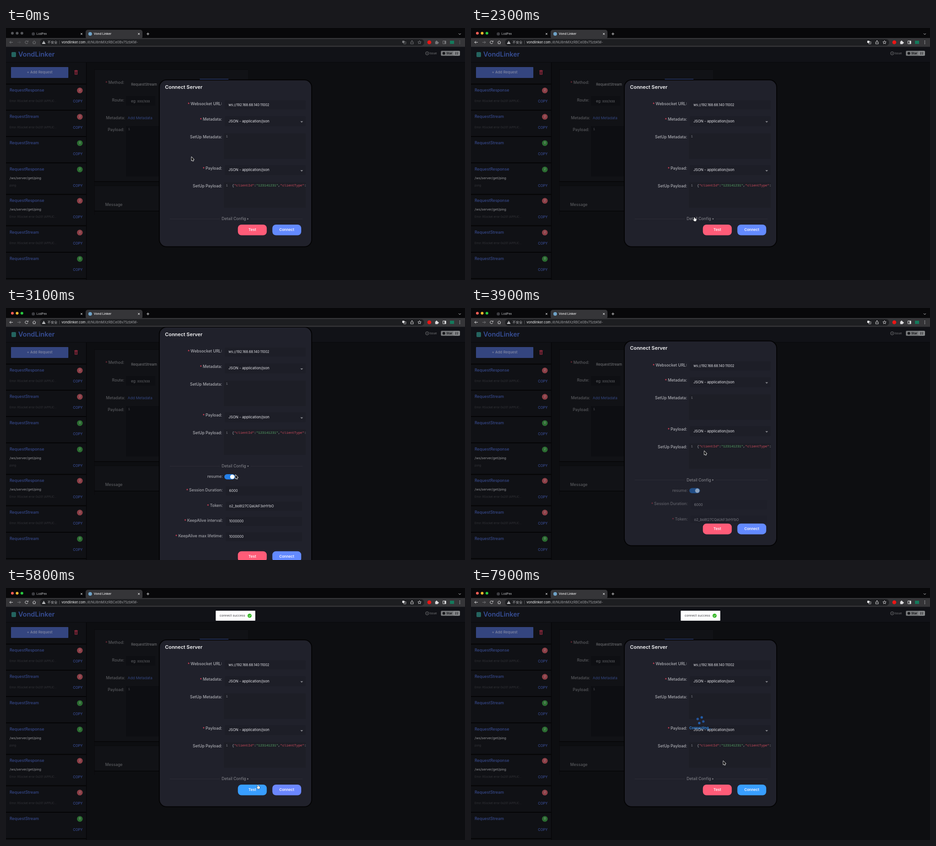
An HTML page with a canvas for the animation above (8000 ms loop, 1009 px wide and 555 px high).

```html
<!DOCTYPE html>
<html lang="en">
<head>
<meta charset="utf-8">
<title>Connect Server</title>
<style>
html, body { margin: 0; width: 100%; height: 100%; overflow: hidden; background: #0d0e11; }
canvas { display: block; width: 1009px; height: 555px; }
</style>
</head>
<body>
<canvas id="stage"></canvas>
<script>
const W = 1009, H = 555, LOOP = 8000;
const canvas = document.getElementById('stage');
const ctx = canvas.getContext('2d');
const dpr = window.devicePixelRatio || 1;
canvas.width = W * dpr;
canvas.height = H * dpr;

const SANS = 'Inter, "Noto Sans CJK SC", "Noto Sans", sans-serif';
const MONO = '"Liberation Mono", "DejaVu Sans Mono", monospace';
const PINK = '#ff5c78', BLUE = '#389eff', INDIGO = '#638aff';
const FIELD = '#1d1e27', EDITOR = '#1d1e26';
const DETAIL_HEIGHT = 175;

const clamp = v => Math.max(0, Math.min(1, v));
const smooth = v => v * v * (3 - 2 * v);
const ramp = (t, from, to) => smooth(clamp((t - from) / (to - from)));

function rect(x, y, w, h, fill, r = 0) {
  ctx.fillStyle = fill;
  ctx.beginPath();
  ctx.roundRect(x, y, w, h, r);
  ctx.fill();
}

function disc(x, y, r, fill) {
  ctx.fillStyle = fill;
  ctx.beginPath();
  ctx.arc(x, y, r, 0, Math.PI * 2);
  ctx.fill();
}

function ring(x, y, r, color, from = 0, to = Math.PI * 2) {
  ctx.strokeStyle = color;
  ctx.lineWidth = 1;
  ctx.beginPath();
  ctx.arc(x, y, r, from, to);
  ctx.stroke();
}

function line(points, color, width = 1) {
  ctx.strokeStyle = color;
  ctx.lineWidth = width;
  ctx.beginPath();
  points.forEach(([x, y], i) => i ? ctx.lineTo(x, y) : ctx.moveTo(x, y));
  ctx.stroke();
}

function poly(points, fill) {
  ctx.fillStyle = fill;
  ctx.beginPath();
  points.forEach(([x, y]) => ctx.lineTo(x, y));
  ctx.closePath();
  ctx.fill();
}

function text(str, x, y, size, color, weight = 400, align = 'left', family = SANS) {
  ctx.font = `${weight} ${size}px ${family}`;
  ctx.textAlign = align;
  ctx.textBaseline = 'middle';
  ctx.fillStyle = color;
  ctx.fillText(str, x, y);
}

function label(str, right, y, color, required, star = '#e0455c') {
  text(str, right, y, 8.8, color, 500, 'right');
  if (required) text('*', right - ctx.measureText(str).width - 2, y + 1, 8.8, star, 500, 'right');
}

function cross(x, y, r, color) {
  line([[x - r, y - r], [x + r, y + r]], color);
  line([[x + r, y - r], [x - r, y + r]], color);
}

function drawBrowser(focused) {
  const icon = focused ? '#dcdcde' : '#77787b';
  const dim = focused ? '#77787b' : '#4b4c50';
  rect(0, 0, W, 22, '#08080a');
  rect(175, 4, 125, 20, '#353538', 5);
  rect(0, 22, W, 19.5, '#353538');
  const lights = focused ? ['#ff5f57', '#febc2e', '#28c840'] : Array(3).fill('#55565a');
  lights.forEach((c, i) => disc(14 + i * 10.5, 11.5, 3, c));

  disc(60, 13, 3.5, '#3c3d42');
  text('LodPex', 67, 13, 6.5, '#c6c7ca');
  cross(166, 13, 2, '#d5d6d8');
  disc(185, 13, 4, '#6fa3c8');
  text('Vond Linker', 193, 13, 6.8, '#eeeeef', 500);
  cross(292, 13, 2, '#e8e8e9');
  line([[309, 13], [315, 13]], '#e0e0e2');
  line([[312, 10], [312, 16]], '#e0e0e2');
  line([[995, 12], [997.5, 14.5], [1000, 12]], '#d0d0d2');

  line([[15, 31.5], [8, 31.5]], icon);
  line([[11, 28.5], [8, 31.5], [11, 34.5]], icon);
  line([[25, 31.5], [32, 31.5]], dim);
  line([[29, 28.5], [32, 31.5], [29, 34.5]], dim);
  ring(45, 31.5, 3, icon, 0.3, 5.4);
  poly([[46, 30.5], [49, 30.5], [49, 27.5]], icon);
  line([[58.5, 31.5], [62, 28.3], [65.5, 31.5]], icon);
  line([[59.7, 31], [59.7, 34.7], [64.3, 34.7], [64.3, 31]], icon);

  rect(75, 24.5, 844, 14.5, '#1d1e21', 7);
  poly([[83, 28], [87, 35], [79, 35]], '#c4c5c8');
  rect(82.6, 30.2, 0.8, 2.4, '#1d1e21');
  text('不安全', 91, 31.5, 7.4, '#b0b1b4');
  rect(117, 27.5, 0.7, 8, '#5c5d61');
  text('vondlinker.com', 122, 31.5, 7.4, '#f0f0f1');
  text('/#/NU8mMXzRBCe0Bv75zbKM-', 177, 31.5, 7.4, '#9b9ca0');

  rect(871, 28, 5, 5, icon, 1);
  ctx.strokeStyle = icon;
  ctx.lineWidth = 0.8;
  ctx.strokeRect(874.5, 30.5, 4.5, 4.5);
  line([[890.5, 30.5], [889.5, 30.5], [889.5, 35], [895.5, 35], [895.5, 30.5], [894.5, 30.5]], icon, 0.9);
  line([[892.5, 33], [892.5, 27.5]], icon, 0.9);
  line([[890.8, 29.2], [892.5, 27.5], [894.2, 29.2]], icon, 0.9);
  const star = Array.from({ length: 11 }, (_, i) => {
    const a = -Math.PI / 2 + i * Math.PI / 5, r = i % 2 ? 1.8 : 3.9;
    return [909 + Math.cos(a) * r, 31.7 + Math.sin(a) * r];
  });
  line(star, icon, 0.9);
  disc(930.5, 31.5, 4.3, '#ec1515');
  rect(943.5, 29.5, 6, 6, icon, 1);
  disc(946.5, 29.2, 1.4, icon);
  disc(950, 32.5, 1.4, icon);
  line([[960.5, 28.5], [967, 28.5], [967, 34.8], [960.5, 34.8], [960.5, 28]], icon);
  rect(964, 28.5, 3, 6.3, icon);
  rect(976, 28, 9, 7, '#147a5c');
  for (let i = 0; i < 3; i++) disc(997.5, 28.5 + i * 3, 0.8, icon);
}

const requests = [
  { y: 137, kind: 'RequestResponse', n: 2, note: 'error' },
  { y: 195, kind: 'RequestStream', n: 2, note: 'error' },
  { y: 253, kind: 'RequestStream', n: 0 },
  { y: 311, kind: 'RequestResponse', n: 2, ok: true, path: true, note: 'pong' },
  { y: 380, kind: 'RequestResponse', n: 2, path: true, note: 'error' },
  { y: 450, kind: 'RequestStream', n: 2, note: 'error' },
  { y: 508, kind: 'RequestStream', n: 0 }
];

function drawSidebar() {
  rect(0, 76, 176, 479, '#101115');
  rect(176, 76, 1.5, 479, '#060608');
  rect(11, 86, 126, 24, '#34457f', 1);
  text('+ Add Request', 74, 98, 8, '#8389a3', 500, 'center');
  ctx.strokeStyle = '#a52c43';
  ctx.lineWidth = 1.2;
  ctx.strokeRect(151.6, 95.5, 4.8, 6.5);
  line([[150, 94], [158, 94]], '#a52c43', 1.2);
  line([[152.5, 93.2], [155.5, 93.2]], '#a52c43');
  cross(154, 98.7, 1.1, '#a52c43');

  rect(0, 122.5, 176, 2, '#040405');
  for (const { y, kind, n, ok, path, note } of requests) {
    const bottom = y + (path ? 36 : 24.5);
    text(kind, 8, y + 0.5, 8.8, '#36498b', 500);
    disc(162.3, y + 0.5, 6.3, ok || !n ? '#2b6d31' : '#8d3f47');
    text(String(n), 162.3, y + 0.7, 6, '#a3a0a1', 400, 'center');
    if (path) text('/ws/server/get/ping', 8, y + 19.5, 7.3, '#85868a', 500);
    if (note) text(note === 'pong' ? 'pong' : 'Error: RSocket error 0x201 (APPLIC...', 8, bottom, 5.9, '#34353a');
    text('COPY', 168.5, bottom + 0.5, 7.5, '#384d96', 500, 'right');
    rect(0, bottom + 18.5, 176, 2, '#040405');
  }
}

function drawPage() {
  rect(0, 41, W, 514, '#0d0e11');
  rect(0, 41.5, W, 34, '#111217');
  rect(0, 75, W, 1, '#08090b');
  rect(12, 53, 10, 11, '#24645f', 2);
  text('VondLinker', 27, 58.5, 14.6, '#364d94', 600);
  ring(925.8, 55.8, 3.5, '#77787b');
  disc(925.8, 55.8, 0.9, '#77787b');
  text('Issue', 931, 55.8, 6.4, '#77787b');
  rect(956, 50.3, 42, 11, '#77797b', 2);
  rect(983.5, 50.8, 14, 10, '#888a8c', 1);
  disc(962.5, 55.8, 3, '#151619');
  text('Star', 968, 55.9, 6.5, '#101114', 700);
  text('22', 990.5, 55.9, 6.5, '#101114', 600, 'center');
  drawSidebar();

  rect(194, 91, 338, 247, '#111216');
  rect(194, 347, 338, 56, '#111216');
  rect(194, 91, 1, 321, '#0a0a0c');
  rect(194, 91, 338, 1, '#090a0c');
  rect(194, 337.5, 338, 1.5, '#050506');
  rect(194, 347, 338, 1, '#090a0c');
  rect(194, 402.5, 338, 1.5, '#050506');
  rect(426, 112, 63, 2, '#30447f');
  rect(264, 150, 64, 21, '#0e0f13');
  rect(264, 216, 80, 111, '#0d0e12');

  const grey = '#58595d';
  label('Method:', 260, 120.5, grey, true, '#7c2c3a');
  label('Route:', 260, 159.5, grey);
  label('Metadata:', 262, 198, grey);
  label('Payload:', 260, 224.5, grey);
  text('RequestStream', 275, 124.8, 7.9, '#78797c');
  text('eg: xxx/xxx', 275, 161.3, 7.7, '#68696d');
  text('Add Metadata', 267.5, 198.5, 8.2, '#33467f');
  text('1', 268.5, 223.5, 7, '#55565a', 400, 'left', MONO);
  text('Message', 218, 389, 8.8, grey, 500);
}

function drawButton(str, x, y, fill) {
  rect(x, y - 11.8, 63.5, 23.6, fill, 8);
  text(str, x + 31.7, y + 0.2, 8, '#f8f6fb', 600, 'center');
}

function drawCode(y) {
  const parts = [['{', '#b9bac0'], ['"clientId"', '#d54c5e'], [':', '#b9bac0'],
    ['"123141231"', '#58a968'], [',', '#b9bac0'], ['"clientType"', '#d54c5e'], [':', '#b9bac0']];
  let x = 497;
  for (const [str, color] of parts) {
    text(str, x, y, 7.35, color, 400, 'left', MONO);
    x += ctx.measureText(str).width;
  }
}

function drawSelect(top, y) {
  rect(481, top + y - 11, 178, 22, FIELD, 2);
  text('JSON - application/json', 489, top + y, 8, '#e8e8ed');
  const cy = top + y + 1;
  poly([[647, cy - 1], [653, cy - 1], [650, cy + 2.3]], '#85868c');
}

const details = [
  ['Session Duration:', '6000', 359.3],
  ['Token:', 'o2_bo8t27CQaUkF3xHYbO', 393],
  ['KeepAlive interval:', '1000000', 426.5],
  ['KeepAlive max lifetime:', '1000000', 460.2]
];

function drawDetails(top, extra, alpha) {
  ctx.save();
  ctx.beginPath();
  ctx.rect(337, top + 317, 335, extra + 1);
  ctx.clip();
  ctx.globalAlpha = alpha;
  label('resume:', 476.5, top + 329.5, '#a2a3a9', true && false);
  rect(480, top + 324, 23.5, 11.5, '#2580e8', 6);
  disc(497.5, top + 329.8, 4.8, '#ffffff');
  for (const [name, value, y] of details) {
    label(name, 476.5, top + y, '#a2a3a9', true);
    rect(483, top + y - 8.5, 168, 20, FIELD, 2);
    text(value, 490.5, top + y + 1.7, 7.6, '#e2e2e7');
  }
  ctx.restore();
}

function drawModal(top, extra, alpha, open, testFill, connectFill) {
  const height = 367.5 + extra;
  rect(336, top - 1, 337, height + 2, '#030304', 17);
  rect(338, top + 1, 333, height - 2, '#20212b', 15);
  text('Connect Server', 349.5, top + 16.7, 10.9, '#f4f4f6', 600);

  const grey = '#acadb3';
  label('Websocket URL:', 475, top + 53.5, grey, true);
  rect(481, top + 45, 178, 20, FIELD, 2);
  text('ws://192.168.68.140:11002', 489, top + 55.2, 7.4, '#e8e8ed');
  label('Metadata:', 475, top + 87.3, grey, true);
  drawSelect(top, 91);
  label('SetUp Metadata:', 475, top + 126, grey);
  rect(479, top + 118, 180, 56, EDITOR);
  text('1', 483.5, top + 125.3, 7, '#82838a', 400, 'left', MONO);
  label('Payload:', 475, top + 194.7, grey, true);
  drawSelect(top, 198.7);
  label('SetUp Payload:', 475, top + 233.7, grey);
  rect(479, top + 225.5, 180, 56, EDITOR);
  text('1', 483.5, top + 232.7, 7, '#82838a', 400, 'left', MONO);
  drawCode(top + 232.7);

  const y = top + 306.3;
  rect(360, y - 0.3, 110, 0.8, '#30313a');
  rect(538, y - 0.3, 114, 0.8, '#30313a');
  text('Detail Config', 474, y + 0.2, 8.7, '#7d7e85', 500);
  poly(open ? [[530, y - 1], [534, y - 1], [532, y + 1.6]]
            : [[530.5, y - 2], [530.5, y + 2], [533.3, y]], '#8b8c92');

  if (extra > 0) drawDetails(top, extra, alpha);
  drawButton('Test', 509.7, top + 330.5 + extra, testFill);
  drawButton('Connect', 585.5, top + 330.5 + extra, connectFill);
}

function drawSpinner(t) {
  const turn = -1.17 + (t - 7900) / 1200 * Math.PI * 2;
  for (let i = 0; i < 4; i++) {
    const a = turn + i * Math.PI / 2;
    disc(504.5 + Math.cos(a) * 6.8, 291.2 + Math.sin(a) * 6.8, 2.7, i % 2 ? '#24549a' : '#235da9');
  }
  text('Connecting...', 480, 308.5, 7.6, '#3390f0', 600);
}

function drawToast(show) {
  ctx.save();
  ctx.globalAlpha = show;
  ctx.translate(0, (show - 1) * 20);
  rect(461, 50, 87, 22, '#ffffff', 1);
  text('connect success', 469.5, 61.2, 7, '#3b3b40');
  disc(535.5, 61, 4.5, '#36b827');
  line([[533.3, 61.1], [535, 62.7], [537.8, 59.6]], '#ffffff');
  ctx.restore();
}

// Pointer stops: time, x, y of the tip
const stops = [
  [0, 407.7, 284], [500, 407.7, 284], [1800, 490, 417], [2600, 490, 417],
  [3400, 511, 345], [3750, 511, 344], [3900, 512.7, 315], [4700, 542, 440],
  [5500, 542, 440], [6700, 609.7, 401], [7150, 616, 441], [7450, 616, 441],
  [7900, 554.5, 381], [8000, 554.5, 381]
];

function pointerAt(t) {
  const i = stops.findIndex(s => s[0] > t);
  const [t0, x0, y0] = stops[i - 1], [t1, x1, y1] = stops[i];
  const p = ramp(t, t0, t1);
  return [x0 + (x1 - x0) * p, y0 + (y1 - y0) * p];
}

function drawPointer(x, y, hand) {
  const shape = hand
    ? 'M0 0.5 Q1 -0.6 1.8 0.6 L2.3 2.8 Q4.5 2.6 5.6 4 L5.2 7 L4.5 8.6 L0.8 8.6 L-1.6 5.2 Q-1.6 4.2 -0.3 4.7 L0.6 5 Z'
    : 'M0 0 L0 8 L1.8 6.4 L3 9 L4.3 8.4 L3.1 5.9 L5.6 5.7 Z';
  const path = new Path2D(shape);
  ctx.save();
  ctx.translate(x, y);
  ctx.lineJoin = 'round';
  ctx.lineWidth = hand ? 1 : 1.6;
  ctx.strokeStyle = hand ? '#111111' : '#f4f4f4';
  ctx.fillStyle = hand ? '#ffffff' : '#0a0a0a';
  ctx.stroke(path);
  ctx.fill(path);
  ctx.restore();
}

function isClickable(x, y, top, extra) {
  const inBox = (l, r, cy, half) => x > l && x < r && Math.abs(y - cy) < half;
  const buttons = top + 330.5 + extra;
  return inBox(474, 535, top + 306.3, 6) || inBox(510, 573, buttons, 12) || inBox(586, 649, buttons, 12);
}

function render(t) {
  ctx.setTransform(dpr, 0, 0, dpr, 0, 0);
  const spread = ramp(t, 2300, 2500) - ramp(t, 3798, 3998);
  const extra = DETAIL_HEIGHT * spread;
  // The dialog stays centred until it outgrows the page
  const top = Math.max(42, 114.3 - extra / 2);
  const open = t > 2300 && t < 3798;
  const testFill = t > 5200 && t < 7300 ? BLUE : PINK;
  const connectFill = t > 7300 ? BLUE : t > 5200 ? '#6b87ff' : INDIGO;

  drawPage();
  drawModal(top, extra, spread, open, testFill, connectFill);
  if (t > 7400) drawSpinner(t);
  if (t > 5400) drawToast(ramp(t, 5400, 5700));
  drawBrowser(t >= 1300);
  const [x, y] = pointerAt(t);
  drawPointer(x, y, isClickable(x, y, top, extra));
}

const start = performance.now();
function tick() {
  render((performance.now() - start) % LOOP);
  requestAnimationFrame(tick);
}
tick();
</script>
</body>
</html>
```
